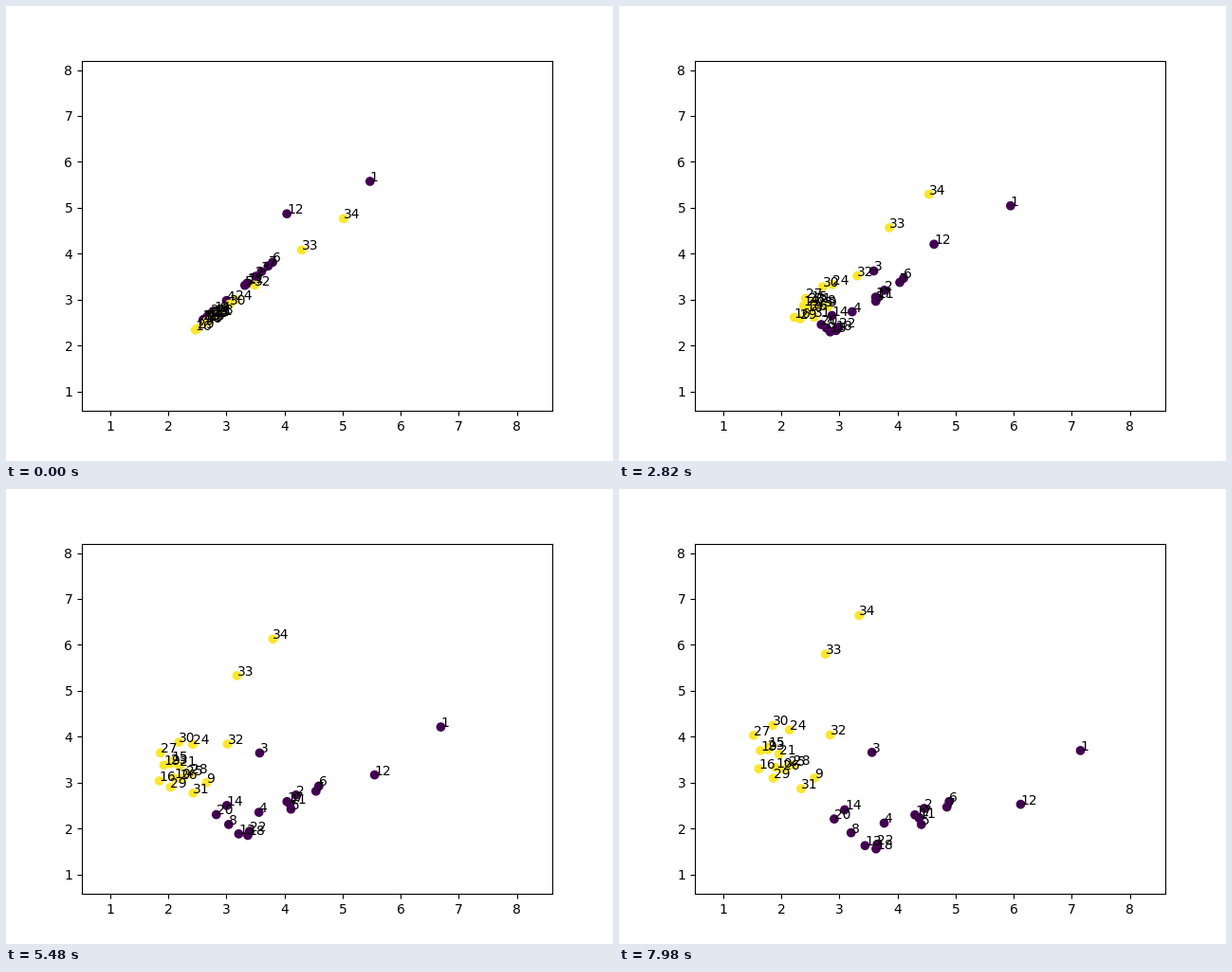
Recreate the animation shown at these times as a matplotlib script. Size 640 px wide and 480 px high, loop 8 s.

```python
import numpy as np
import matplotlib.pyplot as plt
from matplotlib.animation import FuncAnimation

TICK = 20
LOOP = 8000
LAST_STEP = 171

# where nodes 1, 2, 3 ... come to rest; everything else follows by rule
end = np.array([
    (7.15, 3.70), (4.46, 2.44), (3.56, 3.66), (3.77, 2.12), (4.41, 2.09),
    (4.89, 2.59), (4.85, 2.47), (3.20, 1.91), (2.57, 3.10), (1.90, 3.33),
    (4.37, 2.23), (6.12, 2.53), (3.44, 1.63), (3.09, 2.41), (1.78, 3.78),
    (1.61, 3.30), (4.30, 2.30), (3.63, 1.56), (1.64, 3.70), (2.91, 2.21),
    (1.96, 3.62), (3.65, 1.66), (1.77, 3.72), (2.14, 4.15), (2.13, 3.37),
    (2.03, 3.29), (1.52, 4.03), (2.21, 3.39), (1.86, 3.10), (1.85, 4.25),
    (2.34, 2.87), (2.84, 4.04), (2.76, 5.80), (3.34, 6.64)])
x, y = end.T
yellow = y > x + .3

# all nodes drift along one direction, away from a line y = slope * x + base
drift = np.array([1, -1.118])
slope = np.where(yellow, .95, 1.05)
base = np.where(yellow, 0, -.17)
travel = (slope * x + base - y) / (slope - drift[1])
start = end - travel[:, None] * drift
start[11] = 4.04, 4.87  # the one node that begins off the line


def step_at(ms):
    """Steps last 20, 100 and 20 ms in turn."""
    turn, rest = divmod(ms, 140)
    return 3 * turn + (rest >= 20) + (rest >= 120)


def logistic(n):
    return 1 / (1 + np.exp((91 - n) / 38))


def positions(n):
    low, high = logistic(0), logistic(LAST_STEP)
    return start + (end - start) * (logistic(n) - low) / (high - low)


fig, ax = plt.subplots(figsize=(6.4, 4.8), dpi=100)
ax.set_xlim(.51, 8.611)
ax.set_ylim(.578, 8.205)
ax.set_xticks(range(1, 9))
ax.set_yticks(range(1, 9))

dots = ax.scatter(*start.T, c=np.where(yellow, "#fde725", "#440154"))
labels = [ax.text(*xy, str(i)) for i, xy in enumerate(start, 1)]


def update(frame):
    pos = positions(step_at(frame * TICK))
    dots.set_offsets(pos)
    for label, xy in zip(labels, pos):
        label.set_position(xy)
    return [dots, *labels]


anim = FuncAnimation(fig, update, frames=LOOP // TICK, interval=TICK,
                     repeat=True, repeat_delay=0)
plt.show()
```
